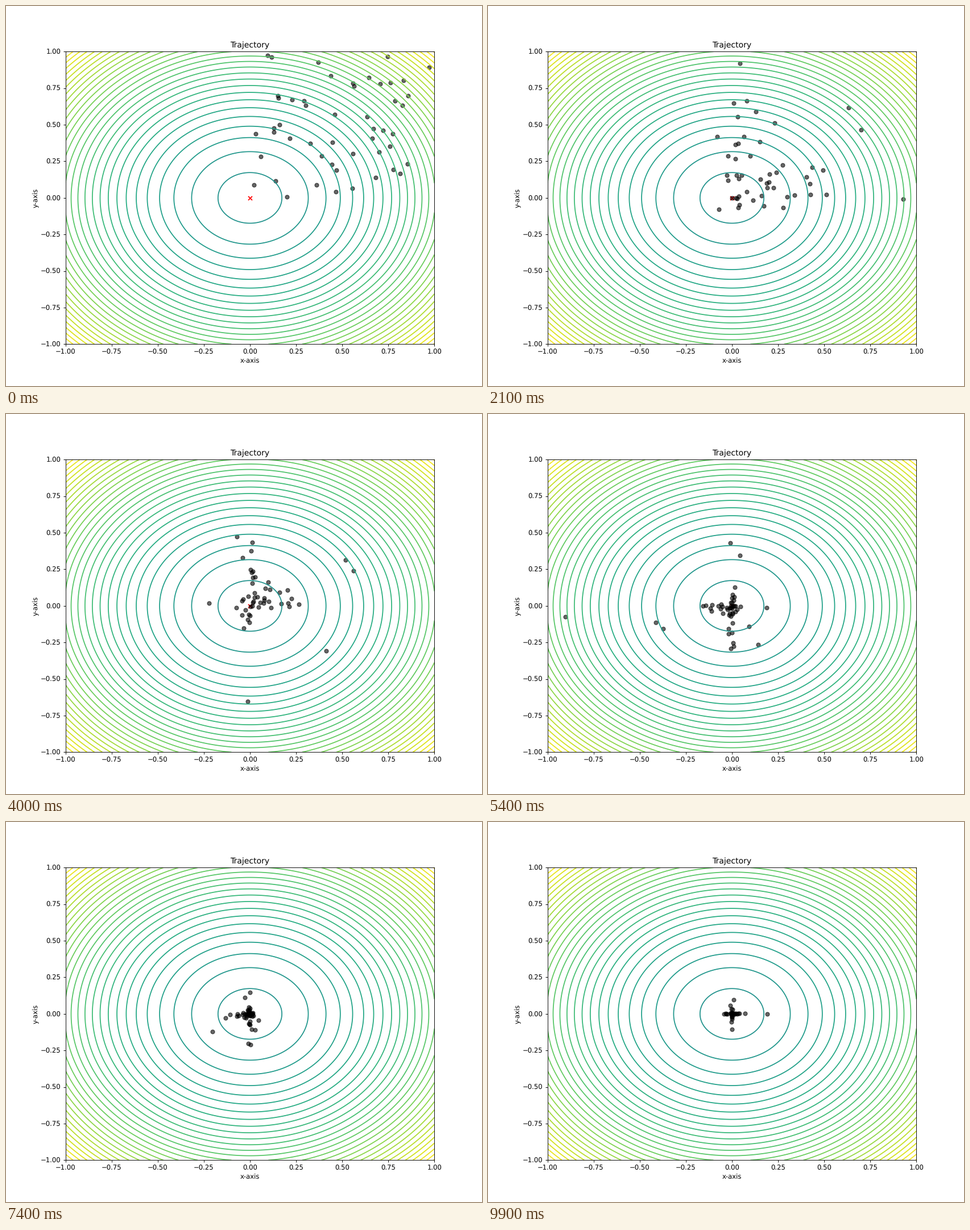
A matplotlib script for the animation above (10 s loop, 837x669 px).

```python
import numpy as np
import matplotlib.pyplot as plt
from matplotlib.animation import FuncAnimation

FRAMES, INTERVAL = 100, 100
PARTICLES = 50
INERTIA, COGNITIVE, SOCIAL = 0.9, 0.5, 0.3


def sphere(p):
    return (p ** 2).sum(axis=-1)


def swarm(count, steps, seed):
    """Global-best particle swarm on the sphere function, one array per step."""
    rng = np.random.default_rng(seed)
    pos, vel = rng.uniform(0, 1, (2, count, 2))
    best = pos.copy()
    path = []
    for _ in range(steps):
        path.append(pos)
        better = sphere(pos) < sphere(best)
        best[better] = pos[better]
        leader = best[sphere(best).argmin()]
        r1, r2 = rng.uniform(0, 1, (2, count, 2))
        vel = (INERTIA * vel + COGNITIVE * r1 * (best - pos)
               + SOCIAL * r2 * (leader - pos))
        pos = pos + vel
    return path


plt.rcParams["text.hinting"] = "none"
path = swarm(PARTICLES, FRAMES, seed=42)

fig, ax = plt.subplots(figsize=(10, 7.993), dpi=83.7)
ax.set_title("Trajectory", fontsize="large")
ax.set_xlabel("x-axis", labelpad=3.2)
ax.set_ylabel("y-axis", labelpad=3.2)
ax.set(xlim=(-1, 1), ylim=(-1, 1))

grid = np.linspace(-1, 1, 201)
xx, yy = np.meshgrid(grid, grid)
ax.contour(xx, yy, xx ** 2 + yy ** 2, levels=np.arange(-2, 2, 0.07))
ax.scatter(0, 0, color="red", marker="x")
dots = ax.scatter([], [], c="black", alpha=0.6)


def update(i):
    dots.set_offsets(path[i])
    return (dots,)


anim = FuncAnimation(fig, update, frames=FRAMES, interval=INTERVAL,
                     repeat=True, repeat_delay=0)
plt.show()
```
